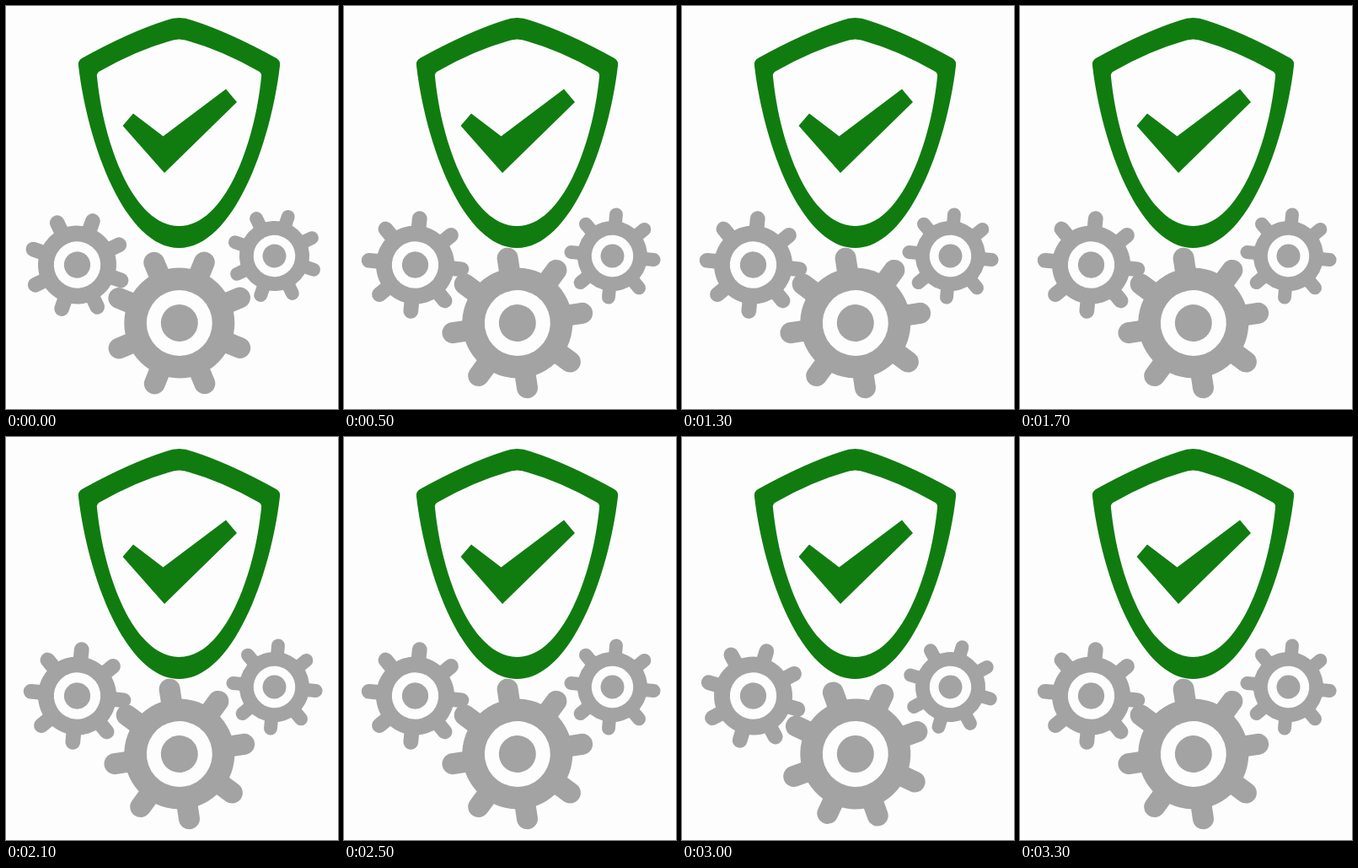
An HTML page for the animation above (3.4 s loop, 394x478 px).

```html
<!DOCTYPE html>
<html>
<head>
<meta charset="utf-8">
<title>Shield and gears</title>
<style>
html, body { margin: 0; width: 100%; height: 100%; overflow: hidden; background: #fdfdfd; }
svg { display: block; }
</style>
</head>
<body>
<svg width="394" height="478" viewBox="0 0 394 478">
  <defs>
    <g id="gear">
      <g id="teeth" stroke="#a3a3a3" stroke-width="25" stroke-linecap="round"></g>
      <circle r="65.5" fill="#a3a3a3"/>
      <circle r="39" fill="#fdfdfd"/>
      <circle r="22" fill="#a3a3a3"/>
    </g>
  </defs>
  <g fill="#107c10">
    <path fill-rule="evenodd" d="M86 71Q85 65 90 62Q146 31 190 17Q205.500 11 221 17Q265 31 321 62Q326 65 325 71C314 165 269 287 205.500 287S97 165 86 71Z
      M108 84Q107 80 111 77.500Q154 53 193 42Q205.500 37 218 42Q257 53 300 77.500Q304 80 303 84C295 165 259 261 205.500 261S116 165 108 84Z"/>
    <path d="M138.500 142L151 127.500L186.500 154.500L261 98.500L274 114L188 198Z"/>
  </g>
  <g id="gears"></g>
</svg>
<script>
const LOOP = 3400, STEP = 100;
const RAMP = 450;            // spin-up time before the speed is constant
const SPEED = 360 / 3200;    // degrees per ms

// x, y, scale, starting angle, direction
const gears = [
  [84.5, 307, 0.71, 19.5, 1],
  [318.5, 296.5, 0.635, 19.3, 1],
  [205.8, 376, 1, 22.3, -1]
];

const svg = (parent, tag, attrs) => {
  const el = document.createElementNS('http://www.w3.org/2000/svg', tag);
  for (const key in attrs) el.setAttribute(key, attrs[key]);
  return parent.appendChild(el);
};

const teeth = document.getElementById('teeth');
for (let i = 0; i < 8; i++)
  svg(teeth, 'line', { y1: -50, y2: -77.7, transform: `rotate(${i * 45})` });

const group = document.getElementById('gears');
const nodes = gears.map(() => svg(group, 'use', { href: '#gear' }));

function spin(t) {
  return SPEED * (t < RAMP ? t * t / (2 * RAMP) : t - RAMP / 2);
}

function draw(now) {
  const t = Math.floor(now % LOOP / STEP) * STEP;
  gears.forEach(([x, y, scale, start, dir], i) => {
    const angle = start + dir * spin(t);
    nodes[i].setAttribute('transform', `translate(${x} ${y}) scale(${scale}) rotate(${angle})`);
  });
}

const begin = performance.now();
function tick() {
  draw(performance.now() - begin);
  requestAnimationFrame(tick);
}
tick();
</script>
</body>
</html>
```
